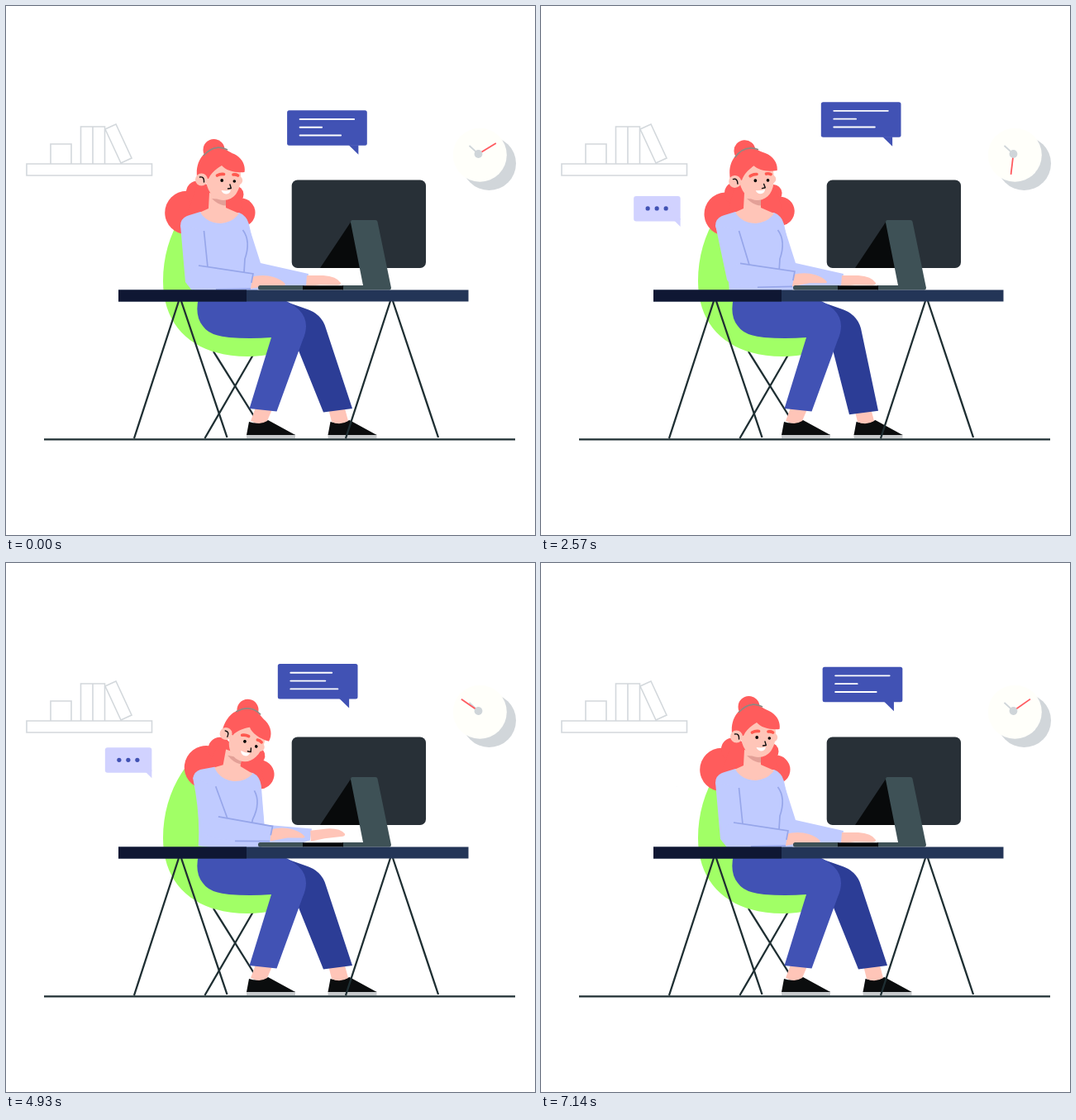
An HTML page for the animation above (7210 ms loop, 640x640 px).

```html
<!DOCTYPE html>
<html lang="en">
<head>
<meta charset="utf-8">
<title>At the desk</title>
<style>
html, body { margin: 0; width: 100%; height: 100%; overflow: hidden; background: #fff; }
svg { display: block; width: 100%; height: 100%; }
.skin { fill: #ffc5b8; }
.hair { fill: #ff5c5c; }
.cloth { fill: #c0cbff; }
.fold { fill: none; stroke: #96a6ea; stroke-width: 1.7; }
.jeans { fill: #4152b4; }
.steel { fill: #3e5156; }
.leg { fill: none; stroke: #1f2f33; stroke-width: 2.3; }
.outline { fill: none; stroke: #d3d8dc; stroke-width: 1.6; }
.note { fill: none; stroke: #fff; stroke-width: 1.9; stroke-linecap: round; }
.ink { fill: none; stroke: #101010; stroke-width: 1.4; stroke-linecap: round; stroke-linejoin: round; }
</style>
</head>
<body>
<svg viewBox="0 0 640 640">
  <defs>
    <g id="shoe">
      <path fill="#c7cacc" d="M291 518H350V523H291Z"/>
      <path fill="#0b0d0e" d="M291 519L294 503Q306 507 317 501L350 519Z"/>
    </g>
  </defs>

  <path class="outline" d="M25 191H176.5V205H25ZM54 167H79V191H54ZM90.5 146H119.5V191H90.5ZM105 146V191M120 149L133 143L152 184L139 190Z"/>

  <circle cx="584.5" cy="190.5" r="32.5" fill="#d1d6da"/>
  <circle cx="573.3" cy="180.3" r="32.5" fill="#fffffa"/>
  <path d="M571.5 179L560.5 169" stroke="#cfd5d9" stroke-width="1.7"/>
  <path id="hand" d="M571.5 179V154" stroke="#ff5a5f" stroke-width="1.8"/>
  <circle cx="571.5" cy="179" r="4.9" fill="#cfd5d9"/>

  <g id="message">
    <rect class="jeans" width="96.7" height="42.5" rx="2.5"/>
    <path class="jeans" d="M74.5 42L86.3 53.5V42Z"/>
    <path class="note"/><path class="note"/><path class="note"/>
  </g>

  <g id="reply">
    <rect x="-56.5" y="-37" width="56.5" height="30.5" rx="3" fill="#d1d2ff"/>
    <path d="M-8 -8L0 0V-10Z" fill="#d1d2ff"/>
    <g class="jeans"><circle cx="-39.5" cy="-22" r="2.6"/><circle cx="-28.5" cy="-22" r="2.6"/><circle cx="-17.5" cy="-22" r="2.6"/></g>
  </g>

  <rect x="345.7" y="210.5" width="162.3" height="106.5" rx="7" fill="#283037"/>
  <path d="M418 260L380 317H432Z" fill="#080a0b"/>

  <path class="leg" d="M251 418L303 501M299 422L240.5 523"/>
  <path fill="#a1ff66" d="M218 246C200 270 190 300 190 333C190 392 232 424 292 424Q310 424 326 420L330 380L262 350Q254 285 218 246Z"/>

  <g id="mane" class="hair">
    <circle cx="218.5" cy="250" r="26.3"/><circle cx="232" cy="225.5" r="14"/>
    <circle cx="284" cy="250" r="17.5"/><circle cx="277" cy="228" r="10.5"/>
    <path d="M211 275L292 266L280 222L232 214Z"/>
  </g>

  <path id="farArm" class="cloth"/>
  <path id="farHand" class="skin" d="M-2 2H18Q34 3 39 11Q39.5 14 34 13.7L14 13.5L-3 15Z"/>

  <g id="torso">
    <path class="cloth" d="M235 249L222 253Q211 256 211 266Q226 310 228 346H304V311L294 264Q291 253 282 250Z"/>
    <path class="fold" d="M286.5 271C294 281 293.5 293 289 306L288 322"/>
    <path class="skin" d="M246 226L245 245L235 249.5Q243 263 260 263Q274 262 282 251L266 244V230Z"/>
    <path d="M249 233Q257 241 266 241.5V234Z" fill="#e3a097"/>
    <g id="head">
      <circle class="hair" cx="251.5" cy="174" r="13"/>
      <circle class="skin" cx="281" cy="211" r="5.2"/>
      <path class="skin" d="M241 200C241 186 250 183 262 183C275 183 284 190 284 205C284 224 276 235 263 235C249 234 241 222 241 200Z"/>
      <path class="hair" d="M231 207C229 184 243 172 258 172C266 172 270 177 276 179C286 184 290 193 288.5 201C277 202 266 199 261 193C254 197 248 202 245 209Z"/>
      <circle class="skin" cx="236.5" cy="210" r="7.5"/>
      <path class="ink" d="M234.5 207Q240 206 239.5 213M271 216L272.3 220.5L268.5 221"/>
      <path d="M239 181Q252 166 268 174" fill="none" stroke="#8f8781" stroke-width="1.7"/>
      <path d="M255.5 205Q259 203 263.5 203.5M275 204Q278 203.5 280.5 205" fill="none" stroke="#ff594f" stroke-width="3.6" stroke-linecap="round"/>
      <circle cx="261.2" cy="211" r="1.9"/><circle cx="276.3" cy="212" r="1.8"/>
      <path d="M260.5 223Q267 224 272 222.5Q271 227.5 266 227.5Q262 227 260.5 223Z" fill="#fff"/>
    </g>
  </g>

  <path id="upperArm" class="cloth"/>
  <path id="crease" class="fold"/>
  <path id="nearHand" class="skin" d="M-3 4Q12 0 25 4Q35 7 39 12.5Q39 14.5 34 14H18L-3 18Z"/>
  <g id="forearm">
    <path class="cloth" d="M-8 4L0 0H66.7L66.5 17L25 26L-10 25Z"/>
    <path class="fold" d="M0 0H66.7L66.3 11M25 25.5L66.5 18.3"/>
  </g>

  <g id="farFoot">
    <use href="#shoe" x="98.5"/>
    <path class="skin" d="M390 487H410L414 502Q404 508 394 503Z"/>
  </g>
  <path id="farLeg" fill="#2c3d96"/>
  <use href="#shoe"/>
  <path class="skin" d="M302 486L322 488L316 502Q306 508 296 502Z"/>
  <path class="jeans" d="M233 353Q228 375 238 387Q246 399 270 401Q295 403 321 401L294.5 487L327.5 490.5L359 404Q369 382 354 367Q345 359 331 353Z"/>

  <path class="steel" d="M419 259H447Q449 259 449.5 261L466 341Q466 343 464 343.5H407V338H432L417 262Q417 259 419 259Z"/>
  <rect x="305" y="338" width="56" height="5.5" rx="2.5" class="steel"/>
  <path d="M359 338.3H408V343.5H359Z" fill="#080a0b"/>
  <path class="leg" d="M209 357L155 523M212 357L267.5 522M465 357L411 523M468 357L523 522M46 524.4H616"/>
  <path d="M136 343.5H559.5V357.5H136Z" fill="#233557"/>
  <path d="M136 343.5H291V357.5H136Z" fill="#0f1733"/>
</svg>

<script>
const LOOP = 7210, CYCLE = LOOP / 2, FRAMES = 101;
const $ = id => document.getElementById(id);
const set = (id, name, value) => $(id).setAttribute(name, value);
const move = (id, value) => set(id, 'transform', value);
const notes = document.querySelectorAll('#message .note');

function ease(p, from, to) {
  const u = Math.min(1, Math.max(0, (p - from) / (to - from)));
  return u * u * (3 - 2 * u);
}
// Rises from 0 to 1, holds, then falls back to 0.
const pulse = (p, rise, top, fall, end) => ease(p, rise, top) - ease(p, fall, end);

function rotate(x, y, degrees, cx = 0, cy = 0) {
  const a = degrees * Math.PI / 180, c = Math.cos(a), s = Math.sin(a);
  return [cx + (x - cx) * c - (y - cy) * s, cy + (x - cx) * s + (y - cy) * c];
}
const polygon = (...points) => 'M' + points.map(p => p.join(' ')).join('L') + 'Z';

function drawBubbles(p) {
  const orbit = 2 * Math.PI * (p - 455) / CYCLE;
  move('message', `translate(${335.4 - 6.6 * Math.sin(orbit)} ${121.7 + 6.5 * Math.cos(orbit)})`);
  const widths = [
    67 - 17 * pulse(p, 0, 1050, 1050, 2600),
    28 + 15.5 * pulse(p, 0, 930, 1500, 2650),
    51 + 10 * pulse(p, 0, 850, 850, 2300),
  ];
  notes.forEach((note, i) =>
    note.setAttribute('d', `M15.5 ${10.7 + 9.8 * i}h${widths[i] - 1.5}`));

  const swing = pulse(p, 700, 1700, 1750, 2950), size = pulse(p, 90, 540, 3040, 3560);
  move('reply', `translate(${164.5 + 17.5 * swing} ${270.5 - 15 * swing}) rotate(${60 * (size - 1)}) scale(${size})`);
}

function drawBody(p) {
  const forward = pulse(p, 500, 1660, 1700, 2500);
  const recoil = pulse(p, 1650, 2500, 2700, 3535);
  const lift = pulse(p, 0, 465, 2700, 3535);
  const press = pulse(p, 0, 465, 465, 1200);

  const bend = 9.4 * forward, sway = `rotate(${bend} 260 380)`;
  const onTorso = (x, y) => rotate(x, y, bend, 260, 380);
  const nod = 20 * pulse(p, 0, 680, 1650, 2500) - 5 * recoil;
  move('torso', sway);
  move('head', `translate(${2 * forward} ${3 * forward}) rotate(${nod - bend} 263 232)`);
  move('mane', `translate(${8 * forward + 5 * recoil} ${2 * forward}) ${sway} rotate(${3 * press - 3 * recoil} 250 245)`);

  const x = 233 + 8 * lift + 20 * forward, y = 314 - 2.7 * lift - 5.5 * forward;
  const turn = 8.6 + 1.8 * forward - 7 * press;
  const [dx, dy] = rotate(66.7, 0, turn);
  set('upperArm', 'd', polygon(onTorso(211, 265), [x - 16, y + 20], [x - 8, y + 30],
    [x + 25, y + 24], [x + 11, y + 2], onTorso(239, 272)));
  set('crease', 'd', `M${onTorso(239.5, 272)}L${x + 11} ${y + 2}`);
  move('forearm', `translate(${x} ${y}) rotate(${turn})`);
  move('nearHand', `translate(${x + dx} ${y + dy})`);

  const wristX = 366 + 5 * forward, wristY = 324 - 3 * forward;
  set('farArm', 'd', polygon(onTorso(293, 264), [308 + 5.5 * forward, 311 + 7 * forward],
    [wristX, wristY], [wristX - 2, wristY + 14], [345, 343], [285, 343]));
  move('farHand', `translate(${wristX} ${wristY}) rotate(${-7 * pulse(p, 1000, 1325, 1325, 1600)})`);

  const back = 11 * pulse(p, 1350, 2200, 2700, 3480), drop = back * .24;
  set('farLeg', 'd', `M325 353L362 366Q382 372 387 390L${419 - back} ${487 + drop}L${384 - back} ${491.5 + drop}L352 412Z`);
  move('farFoot', `translate(${-back} 0)`);
}

function draw(now) {
  const frame = Math.floor(now % LOOP / LOOP * FRAMES + .07) % FRAMES;
  const t = frame * LOOP / FRAMES, p = t % CYCLE;
  move('hand', `rotate(${58.5 + 360 * t / LOOP} 571.5 179)`);
  drawBubbles(p);
  drawBody(p);
}

const start = performance.now();
function tick() {
  draw(performance.now() - start);
  requestAnimationFrame(tick);
}
tick();
</script>
</body>
</html>
```
